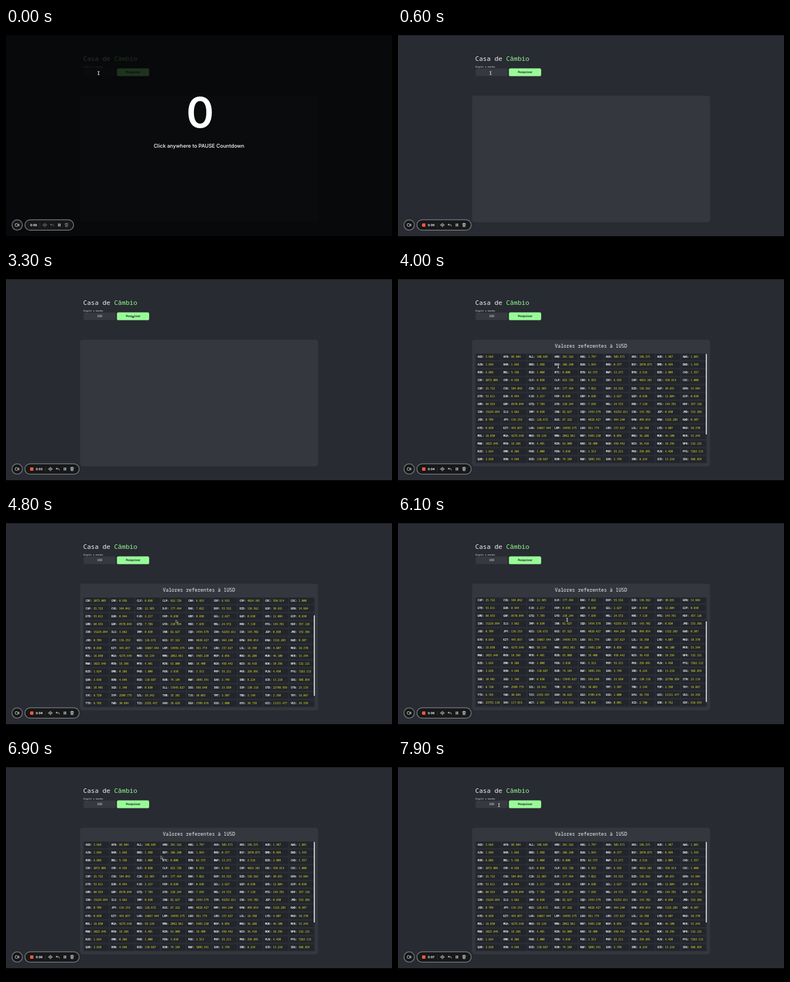
Animation, 690 px wide and 388 px high, one loop 8000 ms. Source, as an HTML page:

```html
<!DOCTYPE html>
<html lang="pt">
<head>
<meta charset="utf-8">
<title>Casa de Câmbio</title>
<style>
  html, body { margin: 0; width: 100%; height: 100%; overflow: hidden; background: #000; }
  svg { display: block; width: 100%; height: 100%; }
  text { white-space: pre; }
  .mono { font-family: "Noto Sans Mono", "DejaVu Sans Mono", monospace; font-weight: 500; fill: #f4f5f6; }
  .sans { font-family: Inter, "Liberation Sans", sans-serif; fill: #fff; }
  .cell { font-size: 4.7px; font-weight: 600; }
  .cell tspan { fill: #f1ee2c; font-weight: 500; }
  .green { fill: #98fb98; }
  .line { fill: none; stroke: #e4e4e4; stroke-width: .8; stroke-linecap: round; stroke-linejoin: round; }
</style>
</head>
<body>
<svg viewBox="0 0 690 388" preserveAspectRatio="none">
  <defs>
    <clipPath id="view"><rect x="137" y="146.5" width="416" height="197"/></clipPath>
  </defs>
  <rect width="690" height="388" fill="#000"/>
  <rect y="13" width="690" height="361" fill="#282b31"/>

  <text class="mono" x="138" y="59.2" font-size="11.5">Casa de <tspan class="green">Câmbio</tspan></text>
  <text class="mono" x="138.6" y="71.3" font-size="4.05">Digite a moeda:</text>
  <rect id="field" x="138.8" y="72.8" width="57.4" height="13.6" rx="2.6" fill="#363940"/>
  <text id="typed" class="mono" x="167.8" y="81.2" font-size="4.8" text-anchor="middle"></text>
  <rect x="198.3" y="72.6" width="57.6" height="13.9" rx="2.6" class="green"/>
  <text class="mono" x="227.2" y="81.2" font-size="4.8" text-anchor="middle" style="fill:#22262b;font-weight:700">Pesquisar</text>

  <rect x="132.3" y="121.5" width="425.6" height="227.5" rx="5" fill="#34373e"/>
  <g id="results">
    <text class="mono" x="345" y="135.6" font-size="8.65" text-anchor="middle">Valores referentes à 1USD</text>
    <rect x="137.7" y="146.5" width="414.6" height="197" fill="#2a2d33"/>
    <g clip-path="url(#view)"><g id="list"></g></g>
    <rect id="thumb" x="550.2" y="147" width="1.9" height="145" rx=".9" fill="#dcdcdc"/>
  </g>

  <g id="veil">
    <rect y="13" width="690" height="361" fill="#000" opacity=".8"/>
    <text class="sans" x="347" y="179" font-size="75" font-weight="600" text-anchor="middle">0</text>
    <text class="sans" x="345" y="215" font-size="9.1" font-weight="500" text-anchor="middle">Click anywhere to PAUSE Countdown</text>
  </g>

  <g fill="#17181a" stroke="#74767a" stroke-width="1.5">
    <circle cx="20" cy="353.8" r="9.3"/>
    <rect id="pill" x="33.8" y="344.6" width="97" height="18.6" rx="9.3"/>
  </g>
  <rect class="line" x="16.6" y="351.6" width="4.6" height="4.6" rx=".9"/>
  <path class="line" d="M21.2 353.4 23.2 352v3.8l-2-1.4"/>
  <rect id="rec" x="43" y="350.9" width="6" height="6" rx=".9" fill="#f4573d"/>
  <g id="tools">
    <text id="clock" class="sans" x="53.2" y="355.8" font-size="5.3" font-weight="700"></text>
    <path d="M70.5 349.5v9" stroke="#34363a" stroke-width=".8"/>
    <g class="dim">
      <path class="line" d="M76 353.2v1.4M77.6 352v3.8M79.3 350.4v7M81 352v3.8M82.6 353.2v1.4"/>
      <path class="line" d="M91.4 351.8l-1.9 1.5 1.9 1.5M89.6 353.3h3.6q2.2 0 2.3 2.5"/>
    </g>
    <path d="M104 351.2v5.4M106.6 351.2v5.4" stroke="#e8e8e8" stroke-width="1.3"/>
    <g class="dim">
      <path class="line" d="M115.2 351.8h5.8M117 351.6v-1h2.2v1M115.9 352.2l.4 4.8h3.6l.4-4.8M117.5 353.4v2.2M118.8 353.4v2.2"/>
    </g>
  </g>

  <g id="beam" fill="none" stroke-linecap="round">
    <path d="M-1.3-3q1.3 0 1.3 1v4q0 1-1.3 1M1.3-3q-1.3 0-1.3 1M0 2q0 1 1.3 1" stroke="#1c1e22" stroke-width="1.7"/>
    <path d="M-1.3-3q1.3 0 1.3 1v4q0 1-1.3 1M1.3-3q-1.3 0-1.3 1M0 2q0 1 1.3 1" stroke="#fff" stroke-width=".9"/>
  </g>
  <path id="arrow" d="M-1.2-3v5.3l1.3-1.1.9 1.9.9-.4-.9-1.9h1.8z" fill="#111" stroke="#e8e8e8" stroke-width=".6"/>
</svg>

<script>
const LOOP = 8000, STEP = 100, PITCH = 14.19;
const $ = id => document.getElementById(id);

const rates = `
AED 3.669,AFN 88.604,ALL 108.685,AMD 391.162,ANG 1.797,AOA 505.571,ARS 196.571,AUD 1.487,AWG 1.801
AZN 1.699,BAM 1.846,BBD 1.998,BDT 106.290,BGN 1.843,BHD 0.377,BIF 2070.875,BMD 0.999,BND 1.345
BOB 6.886,BRL 5.196,BSD 1.000,BTC 0.000,BTN 82.573,BWP 13.271,BYN 2.516,BZD 2.009,CAD 1.357
CDF 2073.005,CHF 0.936,CLF 0.030,CLP 832.726,CNH 6.953,CNY 6.933,COP 4824.101,CRC 550.514,CUC 1.000
CUP 25.722,CVE 104.042,CZK 22.305,DJF 177.454,DKK 7.022,DOP 55.532,DZD 136.562,EGP 30.651,ERN 14.984
ETB 53.611,EUR 0.944,FJD 2.217,FKP 0.830,GBP 0.830,GEL 2.627,GGP 0.830,GHS 12.804,GIP 0.830
GMD 60.933,GNF 8578.044,GTQ 7.789,GYD 210.244,HKD 7.839,HNL 24.572,HRK 7.110,HTG 149.781,HUF 357.126
IDR 15229.894,ILS 3.662,IMP 0.830,INR 82.627,IQD 1454.579,IRR 42253.611,ISK 143.702,JEP 0.830,JMD 153.366
JOD 0.709,JPY 136.153,KES 126.672,KGS 87.322,KHR 4028.427,KMF 464.240,KPW 899.014,KRW 1322.203,KWD 0.307
KYD 0.830,KZT 445.037,LAK 16867.944,LBP 14959.375,LKR 361.774,LRD 157.627,LSL 18.350,LYD 4.807,MAD 10.370
MDL 18.850,MGA 4275.649,MKD 58.139,MMK 2092.961,MNT 3403.230,MOP 8.056,MRU 36.208,MUR 46.100,MVR 15.344
MWK 1023.649,MXN 18.366,MYR 4.481,MZN 63.800,NAD 18.400,NGN 458.442,NIO 36.418,NOK 10.356,NPR 132.121
NZD 1.624,OMR 0.386,PAB 1.000,PEN 3.810,PGK 3.513,PHP 55.211,PKR 256.891,PLN 4.450,PYG 7263.113
QAR 3.638,RON 4.646,RSD 110.687,RUB 74.184,RWF 1085.341,SAR 3.749,SBD 8.224,SCR 13.218,SDG 588.854
SEK 10.401,SGD 1.348,SHP 0.830,SLL 17645.627,SOS 566.640,SRD 33.850,SSP 130.118,STD 22798.959,STN 23.119
SVC 8.720,SYP 2509.775,SZL 18.342,THB 35.101,TJS 10.083,TMT 3.507,TND 3.149,TOP 2.350,TRY 18.867
TTD 6.765,TWD 30.694,TZS 2335.437,UAH 36.629,UGX 3709.676,USD 1.000,UYU 38.739,UZS 11311.477,VES 24.359
VND 23755.138,VUV 117.915,WST 2.695,XAF 618.933,XAG 0.048,XAU 0.001,XCD 2.700,XDR 0.752,XOF 618.933
XPD 0.001,XPF 112.597,XPT 0.001,YER 250.076,ZAR 18.430,ZMW 19.709,ZWL 321.648`;

// Each row spreads its cells with equal gaps, the short last row too.
function buildList() {
  const width = 414.8, cell = 43.6;
  $('list').innerHTML = rates.trim().split('\n').map((line, row) => {
    const items = line.split(',');
    const gap = (width - items.length * cell) / (items.length + 1);
    const y = 152.2 + row * PITCH;
    return items.map((item, col) => {
      const [code, value] = item.split(' ');
      const x = 137.7 + gap + col * (cell + gap);
      return `<rect x="${x}" y="${y - 5.4}" width="${cell}" height="11.2" rx="1.6" fill="#22252b"/>` +
        `<text class="mono cell" x="${x + 2.4}" y="${y + 1.7}">${code}: <tspan>${value}</tspan></text>`;
    }).join('');
  }).join('');
}

const ease = p => p * p * (3 - 2 * p);

// Keys are [time, ...values]; returns the eased values at time t.
function track(keys, t) {
  const i = keys.findIndex(k => k[0] > t);
  if (i < 0) return keys[keys.length - 1].slice(1);
  if (i === 0) return keys[0].slice(1);
  const a = keys[i - 1], b = keys[i];
  const p = ease((t - a[0]) / (b[0] - a[0]));
  return a.slice(1).map((v, n) => v + (b[n + 1] - v) * p);
}

const pointer = [
  [0, 165.5, 81], [900, 165.5, 81], [1300, 169, 81.5], [2500, 169, 81.5], [3000, 227, 81],
  [3600, 227, 81], [4000, 286.5, 169.5], [4400, 305, 190], [5800, 305, 190], [6100, 302.3, 186.5],
  [6400, 294.5, 189], [6700, 294.5, 189], [7600, 164, 80.5], [7900, 180.5, 81]
];
const scroll = [
  [0, 0], [4200, 0], [4800, 42.8], [5000, 42.8], [5400, 58],
  [6100, 58], [6400, 69], [6500, 66.5], [6900, 0]
];
const veil = [[0, 1], [100, 1], [600, 0]];
const ticks = [1000, 2000, 3000, 4000, 5100, 6000, 7000];
const within = (t, a, b) => t >= a && t < b;
const show = (id, on) => $(id).setAttribute('visibility', on ? 'visible' : 'hidden');
const shift = (id, x, y) => $(id).setAttribute('transform', `translate(${x} ${y})`);

function draw(t) {
  $('veil').setAttribute('opacity', track(veil, t)[0]);

  const recording = t >= 200;
  show('rec', recording);
  shift('tools', recording ? 0 : -10, 0);
  $('pill').setAttribute('width', recording ? 97 : 87);
  document.querySelectorAll('.dim').forEach(g => g.setAttribute('opacity', recording ? 1 : .5));
  $('clock').textContent = '0:0' + ticks.filter(s => s <= t).length;

  const focused = within(t, 1100, 2900);
  $('field').setAttribute('stroke', focused ? '#d6d7d9' : 'none');
  $('typed').textContent = 'USD'.slice(0, [1600, 1800, 2400].filter(s => s <= t).length);

  const [offset] = track(scroll, t);
  show('results', t >= 3500);
  shift('list', 0, -offset);
  shift('thumb', 0, offset * 51 / 70);

  const [x, y] = track(pointer, t);
  const arrow = within(t, 2700, 4000) || within(t, 4100, 6000) || within(t, 6200, 7500);
  show('arrow', arrow);
  show('beam', !arrow);
  shift('arrow', x, y);
  shift('beam', x, y);
}

buildList();
function frame() {
  const t = performance.now() % LOOP;
  draw(Math.floor(t / STEP) * STEP);
  requestAnimationFrame(frame);
}
frame();
</script>
</body>
</html>
```
